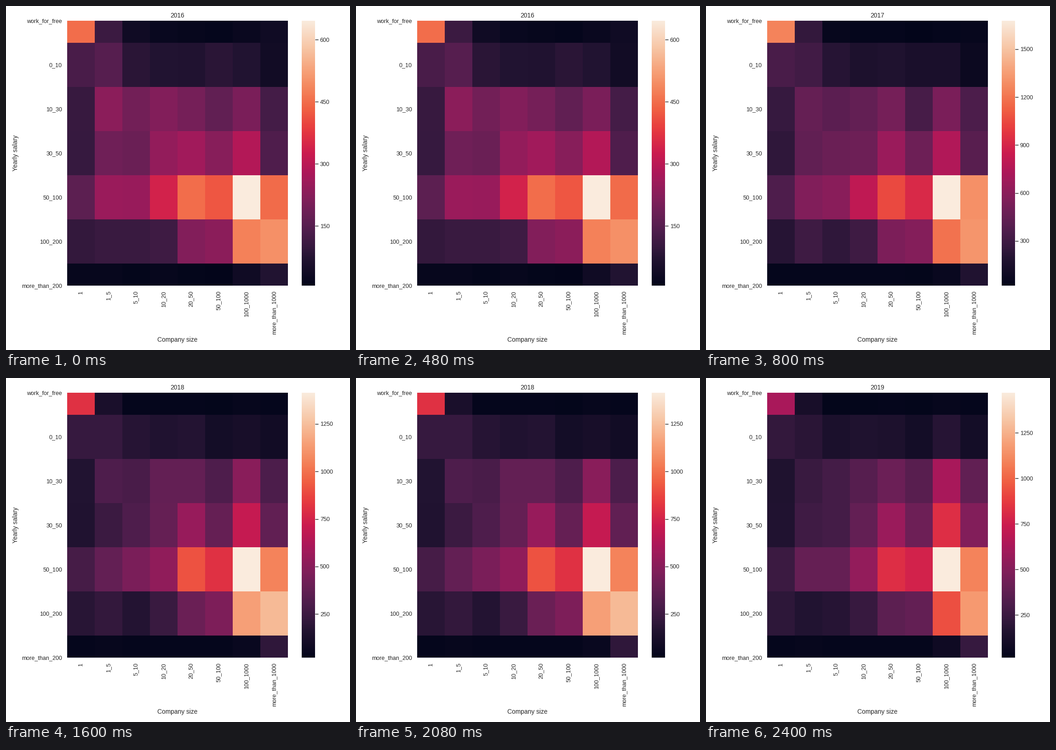
These frames come from a looping animation (748 px wide and 748 px high, 3.2 s). A matplotlib script:

```python
import numpy as np
import matplotlib.pyplot as plt
from matplotlib.animation import FuncAnimation
from matplotlib.colors import LinearSegmentedColormap

SIZE, DPI = 748, 88
PX = 72 / DPI  # points per pixel
INK = "#262626"
TICK_FONT, LABEL_FONT = 12.56 * PX, 13.7 * PX

plt.rcParams.update({
    "font.family": "Liberation Sans",
    "text.color": INK,
    "xtick.color": INK,
    "ytick.color": INK,
})

CMAP = LinearSegmentedColormap.from_list("warm", [
    (0, "#03051a"), (.1, "#221331"), (1 / 7, "#35193e"), (.2, "#4c1d4b"),
    (.25, "#611f53"), (2 / 7, "#701f57"), (1 / 3, "#841e5a"), (.4, "#a11a5b"),
    (3 / 7, "#ad1759"), (.5, "#cb1b4f"), (4 / 7, "#e13342"), (.6, "#e83f3f"),
    (2 / 3, "#f06043"), (5 / 7, "#f37651"), (.75, "#f4875e"), (.8, "#f69c73"),
    (6 / 7, "#f6b48f"), (.9, "#f7c6a6"), (1, "#faebdd"),
])

SALARIES = ["work_for_free", "0_10", "10_30", "30_50", "50_100", "100_200",
            "more_than_200"]
COMPANIES = ["1", "1_5", "5_10", "10_20", "20_50", "50_100", "100_1000",
             "more_than_1000"]

# Cell values in percent of the year's range
GRID_2016 = [
    [69.5, 16, 4.5, 2, 1.5, 1, 2.5, 4.5],
    [19.5, 22.5, 12, 10, 9.5, 12, 10, 5],
    [15, 35, 29, 33, 30, 25, 31, 18],
    [14.5, 28.5, 27, 37, 40, 34, 44.5, 21],
    [24, 38.5, 38, 52, 69.5, 64.5, 100, 69],
    [14, 15.5, 15.5, 16.5, 33, 35, 73.5, 77],
    [1.5, 1.5, 0.5, 1.5, 0.5, 0, 4.5, 10],
]
GRID_2017 = [
    [74, 14, 1.5, 1, 1, 0, 1, 1.5],
    [19.5, 17.5, 11, 8.5, 9, 7.5, 7.5, 3],
    [14.5, 26, 23.5, 25.5, 30, 19, 31, 20],
    [13, 25, 27, 28, 38.5, 28, 44, 23],
    [20.5, 32.5, 34.5, 47, 62, 54, 100, 77],
    [11, 16.5, 13, 16.5, 31.5, 33.5, 70.5, 78.5],
    [1, 1, 1, 1, 1, 0.5, 2, 9.5],
]
GRID_2018 = [
    [56.5, 7.5, 1, 1, 1, 0.5, 1.5, 1],
    [14.5, 14.5, 11, 9.5, 10.5, 5.5, 7, 5],
    [10, 20.5, 19.5, 25.5, 25.5, 20.5, 34.5, 20],
    [9.5, 16, 20.5, 26, 37.5, 26, 48.5, 25],
    [18.5, 25.5, 31, 36, 64, 56.5, 100, 74],
    [11.5, 14, 10.5, 15.5, 27, 32, 80.5, 87],
    [1, 1.5, 1, 1, 1, 1, 2, 13],
]
GRID_2019 = [
    [42, 7, 0.5, 0.5, 1, 0.5, 1.5, 1],
    [14, 12, 8, 9, 8.5, 5.5, 11, 5.5],
    [9, 15.5, 18, 22.5, 27.5, 23, 41.5, 25],
    [9.5, 17, 18, 25.5, 38.5, 28, 55.5, 33],
    [16, 26, 26, 37, 55.5, 52, 100, 74],
    [12.5, 10, 11, 15, 24, 25.5, 63, 79],
    [1, 1.5, 1, 1, 1, 1, 4, 14.5],
]

# title, grid, lowest and highest count, tick step
YEARS = [
    ("2016", GRID_2016, 6, 646, 150),
    ("2017", GRID_2017, 22, 1678, 300),
    ("2018", GRID_2018, 22, 1414, 250),
    ("2019", GRID_2019, 16, 1471, 250),
]

fig = plt.figure(figsize=(SIZE / DPI, SIZE / DPI), dpi=DPI, facecolor="white")


def add_axes(left, top, right, bottom):
    ax = fig.add_axes([left / SIZE, 1 - bottom / SIZE,
                       (right - left) / SIZE, (bottom - top) / SIZE])
    for spine in ax.spines.values():
        spine.set_visible(False)
    return ax


def label(x, y, text, **kw):
    return fig.text(x / SIZE, 1 - y / SIZE, text, fontsize=LABEL_FONT,
                    ha=kw.pop("ha", "center"), va=kw.pop("va", "baseline"),
                    **kw)


heat = add_axes(132.8, 32, 612.8, 607.6)
mesh = heat.pcolormesh(np.array(GRID_2016), cmap=CMAP, vmin=0, vmax=100)
heat.set_xlim(0, 8)
heat.set_ylim(6.5, 0.5)  # outer rows are cut in half
heat.set_xticks(np.arange(8) + 0.5, COMPANIES, rotation=90)
heat.set_yticks(np.arange(7) + 0.5, SALARIES)
heat.tick_params(length=0, labelsize=TICK_FONT)
heat.tick_params(axis="x", pad=12 * PX)
heat.tick_params(axis="y", pad=10.9 * PX)

bar = add_axes(643, 32, 672, 607.6)
ramp = bar.imshow(np.linspace(0, 1, 256)[:, None], cmap=CMAP, origin="lower",
                  aspect="auto", interpolation="nearest")
bar.set_xticks([])
bar.yaxis.tick_right()
bar.tick_params(axis="y", length=6.85 * PX, width=1.43 * PX, pad=4 * PX,
                labelsize=TICK_FONT)

title = label(372.8, 25.2, "")
label(372.8, 729.7, "Company size")
label(24.8, 320, "Yearly salary", rotation=90, ha="right", va="center",
      rotation_mode="default").set_visible(False)
fig.text(24.8 / SIZE, 1 - 320 / SIZE, "Yearly salary", fontsize=LABEL_FONT,
         rotation=90, rotation_mode="anchor", ha="center", va="baseline")


def draw(i):
    name, grid, low, high, step = YEARS[i]
    title.set_text(name)
    mesh.set_array(np.array(grid))
    ramp.set_extent((0, 1, low, high))
    bar.set_xlim(0, 1)
    bar.set_ylim(low, high)
    bar.set_yticks(np.arange(step, high, step))
    return mesh, ramp, title


anim = FuncAnimation(fig, draw, frames=len(YEARS), interval=800, repeat=True,
                     repeat_delay=0, blit=False)
plt.show()
```
